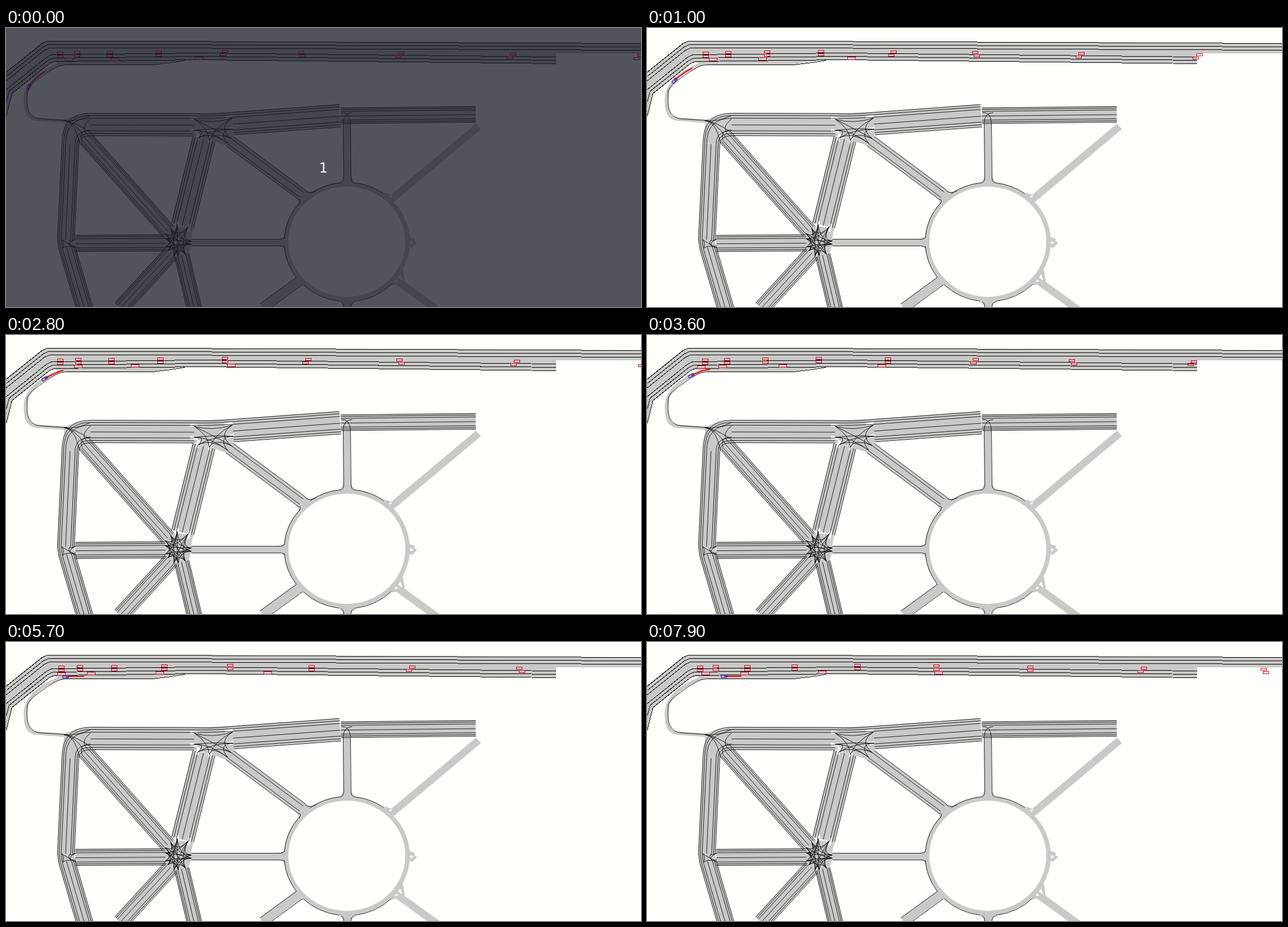
Recreate the animation shown at these times as an HTML page. Size 1129 px wide and 496 px high, loop 8 s.

```html
<!DOCTYPE html>
<html lang="en">
<head>
<meta charset="utf-8">
<title>Merging traffic</title>
<style>
html, body { margin: 0; width: 100%; height: 100%; overflow: hidden; background: #fffffb; }
svg { display: block; width: 1129px; height: 496px; }
path, rect, ellipse { fill: none; stroke-width: 1; }
.area { fill: #c9c9c7; }
.band { stroke: #c9c9c7; }
.gap { fill: #fffffb; }
.mark { stroke: #000; stroke-width: .85; }
.mark.sharp { stroke-width: 1; shape-rendering: crispEdges; }
#cars rect { stroke: #d40022; shape-rendering: crispEdges; }
#trail { stroke: #e8101a; stroke-width: 2.2; }
#ego rect { stroke: #2814c8; stroke-width: 1.2; }
#count { font: 24px "DejaVu Sans", sans-serif; fill: #fff; text-anchor: middle; }
</style>
</head>
<body>
<svg viewBox="0 0 1129 496">
  <g id="map"></g>
  <g id="lines" transform="translate(.5 .5)"></g>
  <path id="trail" d="M35 126Q35 104 57 86Q72 74 90 67Q102 61 118 61H260"/>
  <g id="cars"></g>
  <g id="ego"><rect x="-5" y="-2" width="10" height="4"/></g>
  <g id="shade">
    <rect width="1129" height="496" style="fill:rgba(24,26,38,.75)"/>
    <text id="count" x="564.5" y="257">1</text>
  </g>
</svg>
<script>
const $ = id => document.getElementById(id);
const areas = [], gaps = [], marks = [];
const area = d => areas.push(`<path class="area" d="${d}"/>`);
const band = (d, w) => areas.push(`<path class="band" style="stroke-width:${w}" d="${d}"/>`);
const gap = d => gaps.push(`<path class="gap" d="${d}"/>`);
const mark = (d, kind = "") => marks.push(`<path class="mark ${kind}" d="${d}"/>`);
const mix = (a, b, k) => a + (b - a) * k;

function highway() {
  area("M0 78L62 28L73 23H255L1129 27V45H978V63L345 57H312L260 65H100L82 60L10 116L0 157Z");
  const bend = o => `L${63.75 + .35 * o} ${27 + o}L${72.75 + .35 * o} ${23 + o}`;
  for (const o of [0, 6, 12]) mark(`M0 ${78 + 1.28 * o}${bend(o)}H255L1129 ${27 + o}`, "sharp");
  const tails = { 24: "M0 109", 30: "M0 131L5 112", 36: "M0 157L10 116" };
  for (const o in tails) mark(`${tails[o]}${bend(+o)}L345 ${20 + +o}L978 ${27 + +o}`, "sharp");
  mark("M105 65H260Q290 62 318 57", "sharp");
  band("M108 166L54 162C38 160 34.5 148 34.5 126Q35 104 57 86Q72 74 90 67Q102 61 118 61", 6);
  mark("M108 164L60 161C44 159 37 148 37 130V112Q40 102 59 89Q73 78 88 70Q96 65 106 65");
}

// Draws a street along its centre line; returns its end sections a and b.
function street(x1, y1, x2, y2, w) {
  const len = Math.hypot(x2 - x1, y2 - y1);
  const nx = (y1 - y2) / len * w, ny = (x2 - x1) / len * w;
  const a = t => [x1 + nx * (t - .5), y1 + ny * (t - .5)];
  const b = t => [x2 + nx * (t - .5), y2 + ny * (t - .5)];
  area(`M${a(0)}L${b(0)}L${b(1)}L${a(1)}Z`);
  const lanes = w < 20 ? [0, 1] : w < 25 ? [0, .25, .78, 1] : [0, .1, .22, .52, .78, .9, 1];
  for (const t of lanes) mark(`M${a(t)}L${b(t)}`);
  return { a, b };
}

// Paves a junction and links every two arms with a pair of curves.
function junction(cx, cy, arms, ...corners) {
  const angle = p => Math.atan2(p[1] - cy, p[0] - cx);
  const rim = [...corners, ...arms.flatMap(s => [s(0), s(1)])].sort((p, q) => angle(p) - angle(q));
  area(`M${rim.join("L")}Z`);
  arms.forEach((s, i) => arms.slice(i + 1).forEach(r => {
    for (const t of [.25, .75]) {
      const p = s(t), q = r(t);
      mark(`M${p}Q${mix((p[0] + q[0]) / 2, cx, .7)} ${mix((p[1] + q[1]) / 2, cy, .7)} ${q}`);
    }
  }));
}

function town() {
  const top = street(150, 171, 334, 171.5, 40);
  const rise = street(403, 169.5, 594, 155.5, 40);
  const far = street(595, 155.5, 835, 153, 28);
  const west = street(114, 206, 106, 376, 30);
  const south = street(107.5, 389, 140, 500, 29);
  const middle = street(123, 382.5, 283, 381.5, 29);
  const slant = street(140, 194.5, 287.5, 360.5, 27);
  const lean = street(351.5, 197, 313.5, 351, 40);
  const inner = street(397, 200.5, 525, 295.5, 21);
  const spoke = street(329, 381, 488, 381, 12);
  const down = street(312, 403, 335, 500, 26);
  const back = street(293, 400, 203, 498, 28);
  street(605.5, 168, 606.5, 266, 13);
  street(606.5, 494, 606.5, 500, 13);
  street(521, 449.5, 456, 497, 17);

  junction(122, 178, [slant.a, top.a], [104, 163], [125, 155], west.a(0), west.a(1));
  for (const t of [0, .1, .22, .78, .9, 1]) {
    const p = top.a(t), q = west.a(1 - t);
    mark(`M${p}Q${q[0]} ${p[1]} ${q}`);
  }
  for (const t of [0, .5, 1]) mark(`M102 164Q122 166 ${slant.a(t)}`);
  mark("M104 164Q124 167 150 155");

  junction(364, 176, [top.b, rise.a, inner.a, lean.a]);
  for (const t of [0, .1, .22]) mark(`M${top.b(t)}Q360 ${154 + 30 * t} ${rise.a(t)}`);
  junction(106, 382, [west.b, middle.a, south.a]);
  for (const t of [.78, .9, 1]) mark(`M${west.b(t)}L${south.a(t)}`);
  junction(303, 381, [slant.b, lean.b, spoke.a, down.a, back.a, middle.b]);
  mark("M596 150Q610 148 612 168M615 150Q600 150 599 168");

  // pale crossings
  const tilt = [[334, 161, 6], [334, 183, 6], [396, 158, -8], [398, 180, -8],
    [341, 194, 103], [363, 198, 103], [304, 350, 103], [325, 355, 103]];
  for (const [x, y, a] of tilt)
    gaps.push(`<rect class="gap" x="-7" y="-2.5" width="14" height="5" transform="translate(${x} ${y}) rotate(${a})"/>`);
}

function roundabout() {
  areas.push('<ellipse class="band" cx="606" cy="380" rx="108" ry="102" style="stroke-width:8"/>');
  const at = deg => {
    const a = deg * Math.PI / 180;
    return [606 + 112 * Math.cos(a), 380 + 106 * Math.sin(a)];
  };
  for (const [a, b] of [[-54, -83], [-96, -126], [-139, -176], [176, 144], [134, 97], [83, 45]])
    mark(`M${at(a)}A112 106 0 0 0 ${at(b)}`);
  // flared mouths
  area("M600 264L594 276H620L613 264ZM484 375L496 371V391L484 387ZM600 496L594 484H620L613 496Z");
  area("M530 287L543 293L521 312L517 303ZM513 445L519 438L532 457L524 459Z");
  mark("M600 266Q600 273 594 275M613 266Q613 274 620 275M488 375Q493 375 495 371M488 387Q493 387 495 391");
  mark("M600 494Q600 488 594 486M613 494Q613 488 620 486M531 287Q535 296 551 289M519 304Q526 304 521 312");
  band("M686 304L840 175", 13);
  band("M692 447L768 502", 13);
  area("M672 292L690 298L694 306L684 311ZM698 433L706 430L709 452L686 458L685 446Z");
  area("M716 371L727 375L726 379L731 382L722 391L716 388Z");
  gap("M680 299L687 297L684 302ZM701 438L705 449L697 444ZM693 447L698 450L691 452ZM718 379L725 381L719 385Z");
}

highway();
town();
roundabout();
$("map").innerHTML = areas.join("") + gaps.join("");
$("lines").innerHTML = marks.join("");

// Spans in which the picture refreshes every 100 ms; it holds in between.
const spans = [[0, 0], [200, 400], [600, 1400], [1500, 1800], [2000, 2800], [3000, 3100], [3400, 3600],
  [3800, 4000], [4200, 4200], [4400, 4500], [5200, 5400], [5600, 5900], [6100, 6400], [6600, 6600],
  [6900, 7100], [7300, 7600], [7900, 7900]];
const latest = t => {
  const [first, last] = spans.filter(s => s[0] <= t).pop();
  return Math.min(Math.max(first, Math.floor(t / 100) * 100), last);
};

const laneY = x => x < 345 ? mix(44.2, 41.5, (x - 90) / 255) : mix(41.5, 48.4, (x - 345) / 784);
const box = (x, y, w, h) =>
  `<rect x="${Math.round(x - w / 2) + .5}" y="${Math.round(y - h / 2 - .5) + .5}" width="${w}" height="${h}"/>`;

// Every car starts from rest at the queue and accelerates evenly.
function cars(sec) {
  let out = "";
  for (let k = -3; k < 9; k++) {
    const p = .585 + .369 * sec + k;
    if (p < .05) continue;
    const lead = k < 4 ? 0 : k === 5 ? -.02 : .03;
    const xa = 91 + 13.97 * (p + lead) ** 2, xb = 91 + 13.97 * p ** 2;
    out += box(xa, laneY(xa), 10, 4) + box(xb, laneY(xb) + 6, 10, 4);
  }
  for (let k = 0; k < 4; k++) {
    const u = 15.72 - 5.88 * k + .61 * sec, x = 96 + u * u;
    if (u > 0) out += box(x, laneY(x) + 12.4, 14, 5);
  }
  return out;
}

let shown = -1;
function draw() {
  const t = latest(performance.now() % 8000);
  if (t !== shown) {
    shown = t;
    const sec = t / 1000, path = $("trail");
    const dist = 22 + 14.1 * sec;
    const p = path.getPointAtLength(dist), q = path.getPointAtLength(dist + 2);
    const turn = Math.atan2(q.y - p.y, q.x - p.x) * 180 / Math.PI;
    $("cars").innerHTML = cars(sec);
    $("ego").setAttribute("transform", `translate(${p.x} ${p.y}) rotate(${turn})`);
    path.setAttribute("stroke-dasharray", `0 ${dist} ${40 - 1.2 * sec} 999`);
    $("shade").style.display = t < 200 ? "" : "none";
  }
  requestAnimationFrame(draw);
}
draw();
</script>
</body>
</html>
```
